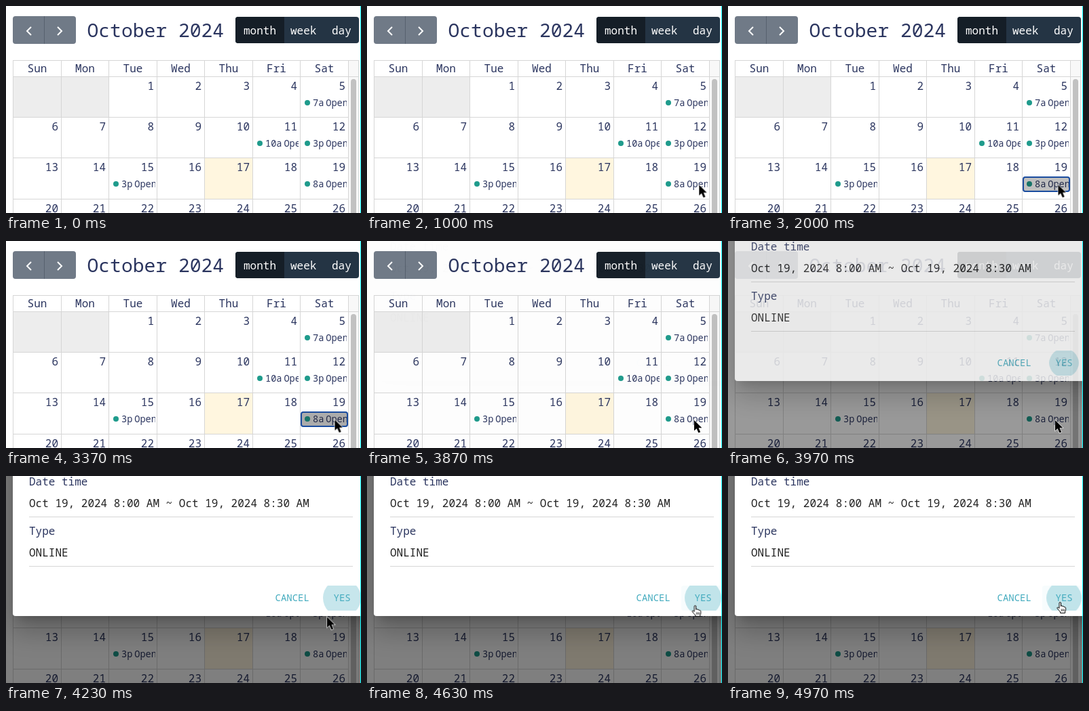
An HTML page that plays this animation: 523 px wide and 306 px high, repeating every 5010 ms.

```html
<!DOCTYPE html>
<html lang="en">
<head>
<meta charset="utf-8">
<title>Calendar booking</title>
<style>
  html, body { margin: 0; width: 100%; height: 100%; overflow: hidden; background: #fff; }
  svg { display: block; }
  text { font-family: "Noto Sans Mono", "DejaVu Sans Mono", monospace; font-size: 16px; fill: #2b355f; white-space: pre; }
  .title { font-size: 28px; }
  .light { fill: #fff; }
  .event { font-size: 13.6px; }
  .value { fill: #222; }
  .action { font-size: 14px; font-weight: 500; fill: #45acbf; }
  .end { text-anchor: end; }
  .mid { text-anchor: middle; }
  .rule { stroke: #d6d6d6; shape-rendering: crispEdges; }
  #paper {
    position: absolute; left: 10px; top: -300px; width: 600px; height: 507px;
    background: #fff; border-radius: 4px;
    box-shadow: 0 11px 15px -7px #0003, 0 24px 38px 3px #00000024, 0 9px 46px 8px #0000001f;
  }
  #stage { position: relative; width: 523px; height: 306px; overflow: hidden; }
  #stage > * { position: absolute; }
  #backdrop { inset: 0; background: #00000080; }
  #dialog { left: 0; top: 0; width: 523px; height: 306px; }
  #dialog svg { position: absolute; }
  #edge { left: 521.5px; top: 0; width: 1.5px; height: 306px; background: #00f4f8; }
</style>
</head>
<body>
<div id="stage">
  <svg id="calendar" width="523" height="306"></svg>
  <div id="backdrop"></div>
  <div id="dialog"><div id="paper"></div><svg id="form" width="523" height="306"></svg></div>
  <svg id="pointer" width="523" height="306"></svg>
  <div id="edge"></div>
</div>
<script>
const LOOP = 5010;
const STANDARD = 'cubic-bezier(.4,0,.2,1)';
const $ = id => document.getElementById(id);

function add(parent, tag, attrs = {}, text) {
  const el = document.createElementNS('http://www.w3.org/2000/svg', tag);
  for (const key in attrs) el.setAttribute(key, attrs[key]);
  if (text) el.textContent = text;
  parent.append(el);
  return el;
}
const rect = (p, x, y, width, height, fill, rx = 0) => add(p, 'rect', { x, y, width, height, fill, rx });
const label = (p, x, y, text, cls = '') => add(p, 'text', { x, y, class: cls }, text);
const rule = (p, x1, y1, x2, y2) => add(p, 'line', { x1, y1, x2, y2, class: 'rule' });

// Steps are [time, properties, easing to the next step].
function loop(el, steps) {
  const frames = steps.map(([time, props, easing = 'linear']) => ({ offset: time / LOOP, easing, ...props }));
  frames.unshift({ ...frames[0], offset: 0, easing: 'linear' });
  frames.push({ ...frames[frames.length - 1], offset: 1 });
  el.animate(frames, { duration: LOOP, iterations: Infinity });
}
const show = (el, from, to = LOOP) => loop(el, [
  [0, { opacity: 0 }], [from, { opacity: 0 }], [from, { opacity: 1 }],
  [to, { opacity: 1 }], ...(to < LOOP ? [[to, { opacity: 0 }]] : [])
]);

// Calendar
const cal = $('calendar');
const colX = [10, 81, 151, 222, 292, 363, 433, 504];
const rowY = [104, 164, 224, 285];

function drawToolbar() {
  rect(cal, 10, 15, 93, 41, '#707a87', 4);
  rect(cal, 56, 15, 1, 41, '#57616f');
  for (const d of ['M37 31l-6 6 6 6', 'M76 31l6 6 -6 6'])
    add(cal, 'path', { d, fill: 'none', stroke: '#fff', 'stroke-width': 2 });
  label(cal, 119.5, 46, 'October 2024', 'title');
  rect(cal, 338, 16, 182, 39, '#243444', 4);
  add(cal, 'path', { d: 'M410 16H342a4 4 0 0 0-4 4v31a4 4 0 0 0 4 4h68z', fill: '#151e27' });
  label(cal, 350, 42, 'month', 'light');
  label(cal, 419, 42, 'week', 'light');
  label(cal, 480, 42, 'day', 'light');
}

function drawGrid() {
  rect(cal, 10, 104, 141, 60, '#ededed');
  rect(cal, 292, 224, 71, 61, '#fff6df');
  rect(cal, 505, 81, 14, 225, '#f8f8f8');
  rect(cal, 508, 108, 8, 230, '#c1c1c1', 4);
  for (const x of [...colX, 519]) rule(cal, x + .5, 80, x + .5, 306);
  rule(cal, 10, 80.5, 520, 80.5);
  rowY.forEach((y, i) => rule(cal, 10, y + .5, i ? 504 : 520, y + .5));
  ['Sun', 'Mon', 'Tue', 'Wed', 'Thu', 'Fri', 'Sat'].forEach((name, col) => {
    label(cal, (colX[col] + colX[col + 1]) / 2 + .5, 98, name, 'mid');
    rowY.forEach((y, row) => {
      const day = row * 7 + col - 1;
      if (day > 0) label(cal, colX[col + 1] - 4, y + 20, String(day), 'end');
    });
  });
}

function drawEvent(col, row, time) {
  const x = colX[col], y = rowY[row] + 39;
  const box = add(cal, 'svg', { x, y: y - 12, width: colX[col + 1] - x - 2, height: 24 });
  add(box, 'circle', { cx: 11, cy: 12, r: 4, fill: '#1f9b8c' });
  label(box, 19, 16.5, time, 'event');
  label(box, 22 + time.length * 8.16, 16.5, 'Open', 'event');
}

drawToolbar();
drawGrid();
const hover = rect(cal, 435, 253, 68, 21, '#0000001a', 3);
drawEvent(6, 0, '7a');
drawEvent(5, 1, '10a');
drawEvent(6, 1, '3p');
drawEvent(2, 2, '3p');
drawEvent(6, 2, '8a');
const focus = add(cal, 'rect', {
  x: 435, y: 253, width: 68, height: 21, rx: 3, fill: '#00000040', stroke: '#1a4c9f', 'stroke-width': 2
});

// Dialog
const form = $('form');
label(form, 34, 14, 'Date time');
label(form, 34, 46, 'Oct 19, 2024 8:00 AM ~ Oct 19, 2024 8:30 AM', 'value');
rule(form, 34, 60.5, 511, 60.5);
label(form, 34, 87, 'Type');
label(form, 34, 119, 'ONLINE', 'value');
rule(form, 34, 133.5, 511, 133.5);
const button = add(form, 'svg', { x: 463, y: 162, width: 64, height: 37 });
const tint = rect(button, 0, 0, 64, 37, '#45acbf0a', 4);
const ripple = add(button, 'circle', { r: 28, fill: '#45acbf', 'fill-opacity': .3 });
label(form, 396.5, 185, 'CANCEL', 'action');
label(form, 482.5, 185, 'YES', 'action');

// Pointer
const pointer = add($('pointer'), 'g');
const arrow = add(pointer, 'path', {
  d: 'M0 0V15.5L3.6 12.3 6.3 18.6 9.2 17.4 6.5 11.2H11.3Z',
  fill: '#000', stroke: '#fff', 'stroke-width': 1.2, 'paint-order': 'stroke'
});
const hand = add(pointer, 'g', { transform: 'translate(-5 -1)', stroke: '#000', fill: '#fff' });
add(hand, 'path', {
  d: 'M4 9.5V2Q4 .6 5.3 .6 6.5 .6 6.5 2V6.5Q7 5.6 8 5.8 9 6 9 7 9.8 6.4 10.6 6.8 11.4 7.2 11.4 8 12.2 7.4 13 8 ' +
     '13.6 8.4 13.6 9.5V11.5Q13.6 13 12.6 14.5V16.6H5.6V15Q3.4 12.6 1.2 9.9 .4 8.8 1.4 8.2 2.4 7.8 4 9.5Z'
});
add(hand, 'path', { d: 'M7.3 10.5v3.5M9.3 10.5v3.5M11.3 10.5v3.5', 'stroke-width': .8 });

// Motion
const OPEN = 3855, OVER_YES = 4460;
const at = (x, y) => ({ transform: `translate(${x}px, ${y}px)` });
const size = s => ({ transform: `translate(32px, 18.25px) scale(${s})` });

loop(pointer, [
  [0, at(530, 266)],
  [770, at(521, 266), 'ease-out'],
  [1070, at(486.5, 264.5)],
  [3340, at(486.5, 264.5)],
  [3370, at(484.5, 264.5), 'ease-out'],
  [3530, at(482, 265)],
  [4000, at(482, 265), 'ease-in-out'],
  [4230, at(473, 208.5)],
  [OVER_YES, at(476, 198), 'ease-out'],
  [4900, at(489, 187)]
]);
show(hand, OVER_YES);
loop(arrow, [[0, { opacity: 1 }], [OVER_YES, { opacity: 1 }], [OVER_YES, { opacity: 0 }]]);
show(focus, 1400, 3870);
show(hover, 3370, 3870);
show(tint, OVER_YES);
for (const id of ['backdrop', 'dialog'])
  loop($(id), [[0, { opacity: 0 }], [OPEN, { opacity: 0 }, STANDARD], [OPEN + 225, { opacity: 1 }]]);
loop(ripple, [
  [0, size(0)],
  [OPEN, size(0), 'ease-out'],
  [3970, size(.77), 'ease-out'],
  [4180, size(1)],
  [4250, size(1), 'ease-in-out'],
  [5000, size(.92)]
]);
</script>
</body>
</html>
```
